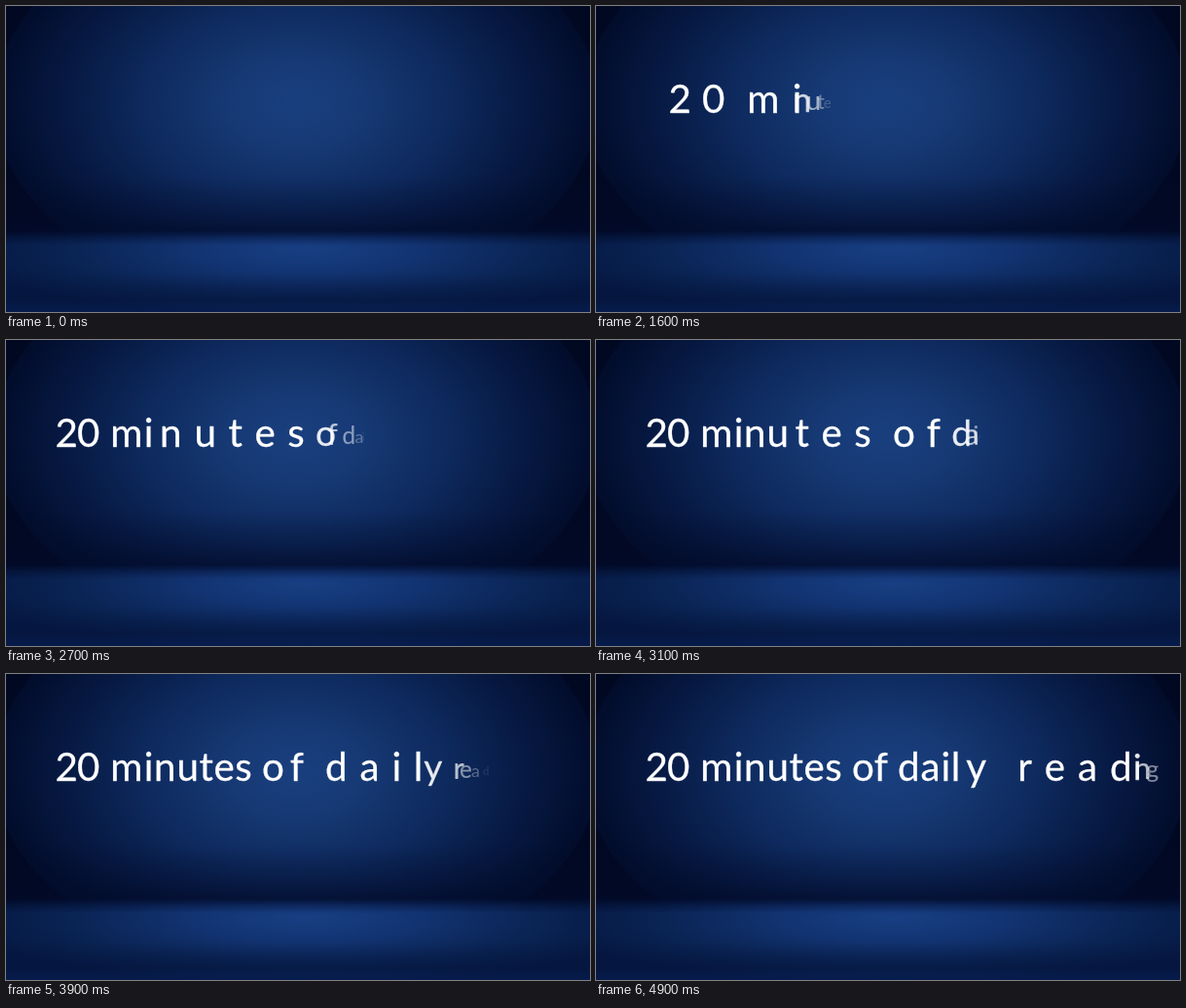
An HTML page that plays this animation: 600 px wide and 315 px high, repeating every 5000 ms.

```html
<!DOCTYPE html>
<html lang="en">
<head>
<meta charset="utf-8">
<title>20 minutes of daily reading</title>
<style>
  html, body { margin: 0; width: 100%; height: 100%; overflow: hidden; background: #020a26; }
  svg { display: block; width: 100%; height: 100%; }
  text {
    font: 400 40.3px Lato, "Open Sans", sans-serif;
    text-anchor: middle;
    fill: #fff;
    stroke: #fff;
    stroke-width: .3px;
  }
</style>
</head>
<body>
<svg viewBox="0 0 600 315">
  <defs>
    <radialGradient id="wall" gradientUnits="userSpaceOnUse" cx="0" cy="0" r="1"
                    gradientTransform="translate(298 100) scale(310 205)">
      <stop offset="0" stop-color="#1a3f7e"/>
      <stop offset=".2" stop-color="#173a76"/>
      <stop offset=".5" stop-color="#0e2a5e"/>
      <stop offset=".75" stop-color="#071a44"/>
      <stop offset="1" stop-color="#020c2b"/>
      <stop offset="1.2" stop-color="#010822"/>
    </radialGradient>
    <linearGradient id="dusk" x1="0" y1="0" x2="0" y2="1">
      <stop offset="0" stop-color="#020b2a" stop-opacity="0"/>
      <stop offset=".6" stop-color="#020b2a" stop-opacity=".35"/>
      <stop offset="1" stop-color="#020b2a" stop-opacity=".72"/>
    </linearGradient>
    <radialGradient id="floor" gradientUnits="userSpaceOnUse" cx="0" cy="0" r="1"
                    gradientTransform="translate(308 251) scale(340 72)">
      <stop offset="0" stop-color="#183f83"/>
      <stop offset=".35" stop-color="#123371"/>
      <stop offset=".7" stop-color="#0a2454"/>
      <stop offset="1" stop-color="#061944"/>
    </radialGradient>
    <linearGradient id="edge" gradientUnits="userSpaceOnUse" x1="0" y1="231" x2="0" y2="246">
      <stop offset="0" stop-color="#000"/>
      <stop offset=".5" stop-color="#999"/>
      <stop offset="1" stop-color="#fff"/>
    </linearGradient>
    <linearGradient id="front" x1="0" y1="0" x2="0" y2="1">
      <stop offset="0" stop-color="#04133a" stop-opacity="0"/>
      <stop offset=".7" stop-color="#04133a" stop-opacity=".5"/>
      <stop offset=".85" stop-color="#061a4a" stop-opacity=".5"/>
      <stop offset="1" stop-color="#071d50" stop-opacity=".6"/>
    </linearGradient>
    <mask id="fade" maskUnits="userSpaceOnUse" x="0" y="228" width="600" height="87">
      <rect y="228" width="600" height="87" fill="url(#edge)"/>
    </mask>
  </defs>
  <rect width="600" height="315" fill="url(#wall)"/>
  <rect y="175" width="600" height="60" fill="url(#dusk)"/>
  <rect y="235" width="600" height="80" fill="#020b2a" opacity=".72"/>
  <rect y="228" width="600" height="87" fill="url(#floor)" mask="url(#fade)"/>
  <rect y="275" width="600" height="40" fill="url(#front)"/>
  <g id="line"></g>
</svg>
<script>
const LOOP = 5000, TICK = 100;
const GAP = 200;            // delay between letters
const FLY = 1000;           // time out, and again time back
const REACH = 60;           // furthest shift to the right
const EM = 44.4, LEFT = 51, BASE = 110, MID = 102;

const phrase = "20 minutes of daily  reading";
const advance = {
  2: .507, 0: .507, " ": .226, m: .799, i: .229, n: .525, u: .525, t: .335,
  e: .498, s: .391, o: .527, f: .305, d: .525, a: .479, l: .229, y: .453,
  r: .349, g: .471
};

const line = document.getElementById("line");
const letters = [];
let x = LEFT;

for (const ch of phrase) {
  const w = advance[ch] * EM;
  if (ch !== " ") {
    const el = document.createElementNS("http://www.w3.org/2000/svg", "text");
    el.textContent = ch;
    el.setAttribute("y", BASE - MID);
    line.append(el);
    letters.push({ el, x: x + w / 2, start: letters.length * GAP });
  }
  x += w;
}

function shift(age) {
  if (age < FLY) return 2 + (REACH - 2) * age / FLY;
  return Math.max(0, REACH * (2 - age / FLY));
}

function draw(time) {
  const t = Math.floor(time % LOOP / TICK) * TICK;
  for (const { el, x, start } of letters) {
    const age = t - start;
    const grow = Math.min(1, Math.max(0, age / FLY));
    const size = .2 + .8 * grow;
    el.setAttribute("opacity", grow);
    el.setAttribute("transform",
      `translate(${(x + shift(Math.max(0, age))).toFixed(2)} ${MID}) scale(${size.toFixed(3)})`);
  }
}

const begin = performance.now();
function frame() {
  draw(performance.now() - begin);
  requestAnimationFrame(frame);
}
frame();
</script>
</body>
</html>
```
